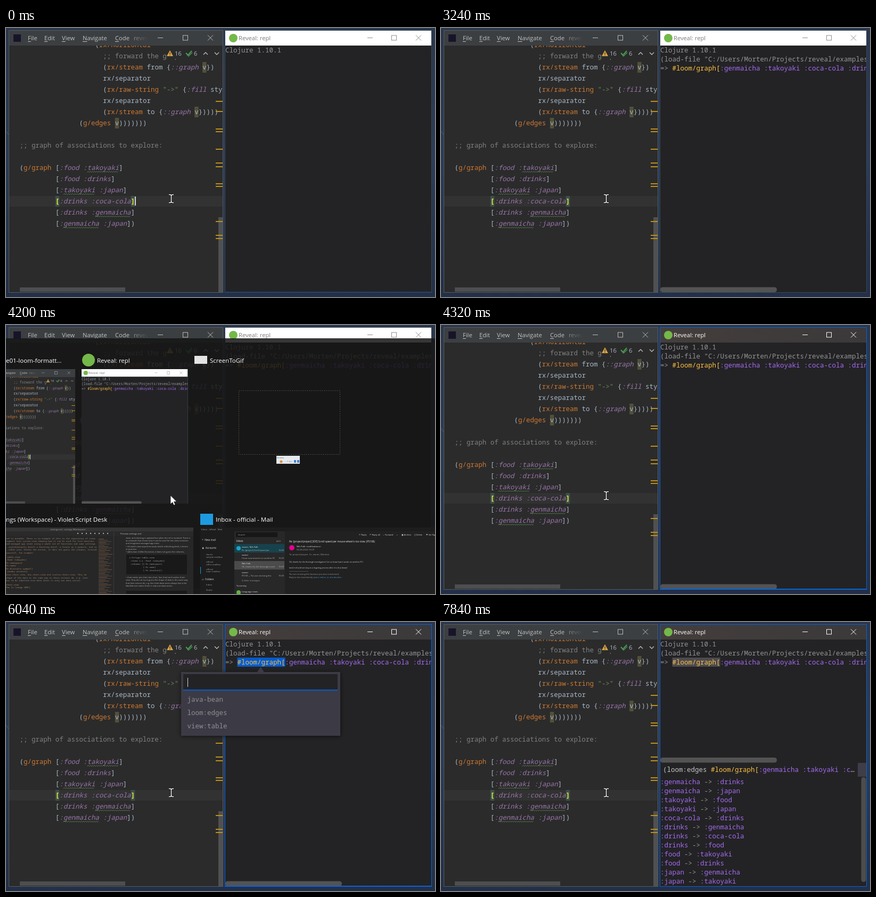
Animation, 806 px wide and 506 px high, one loop 8 s. Source, as an HTML page with a canvas:

```html
<!DOCTYPE html>
<html lang="en">
<head>
<meta charset="utf-8">
<title>Graph exploration in a REPL</title>
<style>
html, body { margin: 0; width: 100%; height: 100%; overflow: hidden; background: #28344a; }
canvas { display: block; }
</style>
</head>
<body>
<canvas id="stage" width="806" height="506"></canvas>
<script>
const ctx = document.getElementById('stage').getContext('2d');
const LOOP = 8000;
const MONO = '"Noto Sans Mono", monospace';
const SANS = '"Open Sans", "Noto Sans", sans-serif';
const BLUE = '#005cd0', BODY = '#232325', AMBER = '#ffc040', PURPLE = '#a46bf0', GRAY = '#949494';

function box(x, y, w, h, color, radius = 0) {
  ctx.fillStyle = color;
  if (!radius) return ctx.fillRect(x, y, w, h);
  ctx.beginPath();
  ctx.roundRect(x, y, w, h, radius);
  ctx.fill();
}

function dot(x, y, r, color) {
  ctx.fillStyle = color;
  ctx.beginPath();
  ctx.arc(x, y, r, 0, 7);
  ctx.fill();
}

function path(points, color, width = 1) {
  ctx.strokeStyle = color;
  ctx.lineWidth = width;
  ctx.beginPath();
  points.forEach(([x, y]) => ctx.lineTo(x, y));
  ctx.stroke();
}

function shape(points, color) {
  ctx.fillStyle = color;
  ctx.beginPath();
  points.forEach(([x, y]) => ctx.lineTo(x, y));
  ctx.fill();
}

function text(str, x, y, color, font = '11.2px ' + SANS) {
  ctx.font = font;
  ctx.fillStyle = color;
  ctx.fillText(str, x, y);
}

function blend(x0, y0, x1, y1, ...colors) {
  const gradient = ctx.createLinearGradient(x0, y0, x1, y1);
  colors.forEach((color, i) => gradient.addColorStop(i / (colors.length - 1), color));
  return gradient;
}

function clipped(x, y, w, h, draw) {
  ctx.save();
  ctx.beginPath();
  ctx.rect(x, y, w, h);
  ctx.clip();
  draw();
  ctx.restore();
}

function controls(xs, color) {
  const [min, max, close] = xs, y = 18.5;
  path([[min - 5, y], [min + 5, y]], color);
  ctx.strokeRect(max - 4.5, y - 4.5, 9, 9);
  path([[close - 5, y - 5], [close + 5, y + 5]], color);
  path([[close + 5, y - 5], [close - 5, y + 5]], color);
}

/* ---------- code editor ---------- */

const COL = 7.47;
const CODE_STYLES = {
  d: { color: '#a9b7c6' },
  o: { color: '#cc7832' },
  s: { color: '#6a8759' },
  c: { color: '#808080' },
  k: { color: '#9876aa', font: 'italic ' },
  w: { color: '#9876aa', font: 'italic ', wave: true },
  v: { color: '#a9b7c6', back: '#52503a' },
  b: { color: '#ffef28', font: 'bold ', back: '#3b514d' }
};

function wave(x, y, width) {
  const points = [];
  for (let i = 0; i <= width; i += 2) points.push([x + i, y + (i % 4 ? -1 : 1)]);
  path(points, '#56824f');
}

// The first letter of each run names its style.
function codeLine(col, mid, ...runs) {
  let x = 25.5 + col * COL;
  for (const run of runs) {
    const style = CODE_STYLES[run[0]], str = run.slice(1), width = str.length * COL;
    if (style.back) box(x, mid - 10, width, 20, style.back);
    text(str, x, mid + 4, style.color, (style.font || '') + '12.45px ' + MONO);
    if (style.wave) wave(x + COL, mid + 7.5, width - COL);
    x += width;
  }
}

function editorCode() {
  codeLine(19, 32, 'd(', 'orx/horizontal');
  codeLine(21, 53, 'c;; forward the graph');
  codeLine(21, 74, 'd(', 'orx/stream', 'd from {', 'k::graph', 'd ', 'vv', 'd})');
  codeLine(21, 95, 'drx/separator');
  codeLine(21, 116, 'd(', 'orx/raw-string', 'd ', 's"->"', 'd {', 'k:fill', 'd style');
  codeLine(21, 137, 'drx/separator');
  codeLine(21, 158, 'd(', 'orx/stream', 'd to {', 'k::graph', 'd ', 'vv', 'd}))))');
  codeLine(15, 179, 'd(', 'og/edges', 'd ', 'vv', 'd)))))))');
  codeLine(0, 221, 'c;; graph of associations to explore:');
  codeLine(0, 263, 'd(', 'og/graph', 'd [', 'k:food', 'd ', 'w:takoyaki', 'd]');
  codeLine(9, 284, 'd[', 'k:food', 'd ', 'k:drinks', 'd]');
  codeLine(9, 305, 'd[', 'w:takoyaki', 'd ', 'k:japan', 'd]');
  codeLine(9, 326, 'b[', 'k:drinks', 'd ', 'k:coca-cola', 'b]');
  codeLine(9, 347, 'd[', 'k:drinks', 'd ', 'w:genmaicha', 'd]');
  codeLine(9, 368, 'd[', 'w:genmaicha', 'd ', 'k:japan', 'd])');
}

function inspections() {
  box(303, 38, 104, 20, '#2b2b2b');
  shape([[308, 42], [314, 53], [302, 53]], '#d9a343');
  box(307.4, 46, 1.3, 3.5, '#2b2b2b');
  box(307.4, 50.5, 1.3, 1.3, '#2b2b2b');
  text('16', 317, 52, '#a9b7c6');
  path([[338, 47], [342, 51], [349, 43]], '#499c54', 2);
  path([[340, 50], [343, 53], [350, 46]], '#499c54', 1.3);
  text('6', 353, 52, '#a9b7c6');
  path([[371, 50], [375, 46], [379, 50]], '#b8bcbf', 1.4);
  path([[392, 46], [396, 50], [400, 46]], '#b8bcbf', 1.4);
}

function editorTitle() {
  box(6, 5, 401, 28, '#3c3f41');
  box(14, 12, 14, 14, '#17142a');
  const menu = [['File', 41], ['Edit', 72], ['View', 105], ['Navigate', 144], ['Code', 205]];
  for (const [name, x] of menu) {
    text(name, x, 23, '#c0c0c0');
    box(x, 25, ctx.measureText(name[0]).width, 1, '#c0c0c0');
  }
  text('revea', 240, 23, blend(240, 0, 267, 0, '#8c8e8f', '#3c3f41'));
  controls([290, 337, 384], '#bbbbbb');
}

function editor(caret) {
  box(5, 4, 403, 494, '#565b5f');
  clipped(6, 5, 401, 492, () => {
    box(6, 33, 401, 464, '#2b2b2b');
    box(6, 316, 401, 20, '#323232');
    clipped(6, 33, 401, 464, editorCode);
    inspections();
    box(399, 356, 8, 141, '#4f5051');
    box(26, 488, 198, 8, '#4d4e4f');
    for (const y of [138, 157, 190, 195, 228, 254, 261, 293, 298, 364, 390, 396])
      box(394, y - 1, 13, 2, '#be9117');
    if (caret) box(242, 317, 2, 17, '#d0d0d0');
    editorTitle();
  });
}

/* ---------- REPL window ---------- */

const CELL = 7.5;

function replLine(x, mid, ...runs) {
  for (const [str, color] of runs) {
    text(str, x, mid + 4, color, '12.5px ' + MONO);
    x += str.length * CELL;
  }
}

const EDGES = [
  'genmaicha drinks', 'genmaicha japan', 'takoyaki food', 'takoyaki japan',
  'coca-cola drinks', 'drinks genmaicha', 'drinks coca-cola', 'drinks food',
  'food takoyaki', 'food drinks', 'japan genmaicha', 'japan takoyaki'
];

function edgesPanel() {
  box(412, 265, 387, 232, BODY);
  box(783, 265, 16, 26, '#3e3d48');
  replLine(417, 278, ['(loom:edges ', '#c4c4c4'], ['#loom/graph[', AMBER],
    [':genmaicha :takoyaki :c', PURPLE], ['…', '#c4c4c4']);
  EDGES.forEach((edge, i) => {
    const [from, to] = edge.split(' ');
    replLine(412, 301 + 17 * i, [':' + from, PURPLE], [' -> ', GRAY], [':' + to, PURPLE]);
  });
  box(789.5, 292, 9, 197, '#4d4d4d', 4.5);
}

function repl(s) {
  const accent = '#0a63d6';
  box(411, 4, 389, 494, s.active ? accent : '#3a4554');
  clipped(412, 5, 387, 492, () => {
    box(412, 5, 387, 28, s.active ? blend(412, 0, 799, 0, '#443e3c', '#3b393a') : '#ffffff');
    dot(427, 19, 8, '#74b84a');
    text('Reveal: repl', 437, 23, s.active ? '#ffffff' : '#7c7c7c');
    controls([684, 729, 775], s.active ? '#ffffff' : '#8c8c8c');
    box(412, 33, 387, 464, BODY);
    replLine(412, 42, ['Clojure 1.10.1', GRAY]);
    if (s.loaded)
      replLine(412, 59, ['(load-file "C:/Users/Morten/Projects/reveal/examples/', GRAY]);
    if (s.result) {
      if (s.pick === 'prompt') box(412, 67, 15, 17, BLUE);
      if (s.pick === 'graph') box(434.5, 67, 90, 17, s.panel ? '#4c4b50' : BLUE);
      replLine(412, 76, ['=> ', GRAY], ['#loom/graph[', AMBER],
        [':genmaicha :takoyaki :coca-cola :drinks', PURPLE]);
    }
    if (s.scroll) box(412, s.panel ? 255 : 487.5, 219, 9.5, '#535353', 4.5);
    if (s.panel) edgesPanel();
    else if (s.active) box(412, 496, 387, 1, accent);
    else if (!s.scroll) box(412, 496, 387, 1, '#123f7c');
  });
}

function popup(t) {
  const focused = t < 6760;
  ctx.save();
  ctx.shadowColor = 'rgba(0,0,0,.6)';
  ctx.shadowBlur = 8;
  ctx.shadowOffsetY = 1;
  box(329, 94, 299, 120, '#3c3b45');
  ctx.restore();
  shape([[478.5, 84], [485, 94.5], [472, 94.5]], '#3c3b45');
  box(333, 98, 290, 31, BODY);
  if (focused) box(333, 127, 290, 2, BLUE);
  if (t < 6440) box(341, 105, 1, 17, '#d8d8d8');
  const chosen = focused ? -1 : t < 7000 ? 0 : 1;
  ['java-bean', 'loom:edges', 'view:table'].forEach((item, i) => {
    if (i === chosen) box(333, 134 + 25 * i, 290, 25, BLUE);
    replLine(340.5, 146 + 25 * i, [item, i === chosen ? '#d6dcea' : '#8e8e93']);
  });
}

/* ---------- task switcher ---------- */

function tiny(str, x, y, color = '#a0a0a0', family = SANS, size = 4.2) {
  text(str, x, y, color, size + 'px ' + family);
}

function thumbnail(x, y, fromX, draw) {
  ctx.save();
  ctx.translate(x, y);
  ctx.scale(.515, .515);
  ctx.translate(-fromX, -5);
  draw();
  ctx.restore();
}

function docsThumb() {
  const warm = '#a5805f', plain = '#96897c', code = '#b08a66';
  box(0, 381, 352, 125, '#272727');
  box(0, 381, 352, 7, '#343435');
  box(0, 388, 352, 9, '#2a2a2b');
  tiny('settings.md - settings (Workspace)', 83, 386);
  tiny('Preview settings.md', 215, 394, '#c8c8c8');
  for (let i = 0; i < 8; i++) dot(135 + i * 8, 392, 1.2, '#a8a8a8');
  const prose = [
    'ref is mutable. There is an example of this in the repository of views',
    'segment tree system view showing how it can be used for live monitors',
    'and managed app state using a small set of functions and some settings',
    '- asynchronously derefs a blocking deref, a future or a promise, and so',
    '- table view. Unlike the action, it does not guess the columns, instead',
    'yourself, for example:'
  ];
  prose.forEach((line, i) => tiny(line, 0, 402.5 + 5.4 * i, i % 2 ? warm : plain, MONO, 4));
  ['-table-view', ':food :takoyaki}', 'fn namespace}', 'fn name}', 'fn #(resolve symbol)}', ':render resolve}]']
    .forEach((line, i) => tiny(line, 0, 438 + 5.4 * i, code, MONO, 4));
  tiny('line-chart-view, bar-chart-view and scatter-chart-view. They do', 0, 471, warm, MONO, 4);
  tiny('shape of the data in the same way as their actions do, e.g. line', 0, 477, plain, MONO, 4);
  tiny('has to be labelled even when there is only one data series:', 0, 482, plain, MONO, 4);
  tiny('chart-view', 0, 490, code, MONO, 4);
  tiny('for [x (range 100)]', 0, 495, code, MONO, 4);
  for (let i = 0; i < 44; i++) box(174, 402 + i * 2.4, 10 + (i * 7) % 17, 1, i % 3 ? '#574a3f' : '#75533c');
  box(202, 389, 1, 117, '#3a3a3a');
  box(226, 432, 114, 37, '#19191a');
  box(226, 500, 114, 6, '#19191a');
  ['state, and showing it updated live when the ref is mutated. There is',
    'an example that shows how it can be used for live state monitors',
    'and integrated managed app state.',
    '• ref-watch-view asynchronously derefs a blocking deref, a future',
    'or promise.',
    '• table-view. Unlike the action, it does not guess the columns,'
  ].forEach((line, i) => tiny(line, 225, 402 + 5.2 * i, '#b4b4b4', SANS, 3.9));
  ['{:fx/type table-view', ' :items [:a :food :takoyaki]', ' :columns [{:fn namespace}', '           {:fn name}', '           {:fn resolve}]}']
    .forEach((line, i) => tiny(line, 231, 439 + 6 * i, '#a3a3a3', MONO, 4));
  ['• chart views: pie-chart, bar-chart, line-chart and scatter-chart',
    'view. They do not try to guess the shape of data in the same way',
    'that their actions do, e.g. line chart data series always has to be',
    'labelled even when there is only one data series:'
  ].forEach((line, i) => tiny(line, 225, 476 + 5.4 * i, '#b4b4b4', SANS, 3.9));
}

function mailThumb() {
  box(365, 381, 441, 125, '#1d1d1e');
  box(429, 388, 95, 118, '#282829');
  box(524, 388, 282, 118, '#212122');
  tiny('Inbox - official - Mail', 367, 386);
  [['+  New mail', 406], ['♟  Accounts', 421], ['▱  Folders', 480]]
    .forEach(([str, y]) => tiny(str, 368, y, '#e0e0e0', SANS, 4.8));
  [['classic', 433], ['sample mailbox', 438], ['official', 447], ['office mailbox', 452], ['official', 461], ['main mailbox', 465], ['Inbox', 490], ['Drafts', 500]]
    .forEach(([str, y]) => tiny(str, 376, y));
  box(365, 455, 1, 13, '#1e9be0');
  box(432, 390, 78, 9, '#171717');
  tiny('Search', 436, 396);
  tiny('Inbox', 433, 408, '#ffffff', SANS, 4.8);
  tiny('All ▾', 508, 408);
  box(429, 412, 94, 16, '#17424d');
  dot(437, 420, 4, '#18a6c4');
  box(429, 444, 94, 16, '#4b4b4c');
  [['owner, Nils Falk', 'Re: [project] Scroll speed per', 419],
    ['owner', 'I have now tested it on another PC', 434],
    ['Nils Falk', 'Ok, thanks for the thorough invest', 450],
    ['owner', 'PS168 — You are receiving this', 467]
  ].forEach(([who, subject, y]) => {
    tiny(who, 443, y, '#e4e4e4');
    tiny(subject, 443, y + 6, '#b8b8b8', SANS, 3.9);
    tiny('16:09', 512, y + 6, '#b8b8b8', SANS, 3.9);
  });
  tiny('4 older messages', 443, 482);
  tiny('Yesterday', 433, 492, '#d0d0d0');
  dot(437, 503, 4, '#63b246');
  tiny('Language news', 443, 503, '#e4e4e4');
  [['↶ Reply', 663], ['↶ Reply all', 683], ['→ Forward', 707], ['☼', 733], ['▣ Archive', 743], ['▯ Delete', 767], ['⚑ Set flag', 789]]
    .forEach(([str, x]) => tiny(str, x, 396, '#d8d8d8', SANS, 4));
  tiny('Re: [project/project] [IDE] Scroll speed per mouse wheel is too slow. (PS168)', 532, 409, '#ededed', SANS, 4.6);
  dot(537, 419, 5, '#e3008c');
  tiny('Nils Falk <notifications>', 546, 418, '#e4e4e4');
  tiny('06.08.2020 16:09', 546, 424);
  tiny('To: project/project  Cc: owner; Mention', 532, 433);
  tiny('Ok, thanks for the thorough investigation! Let us know how it works on another PC!', 532, 447, '#d4d4d4', SANS, 3.6);
  tiny('(and it should not stay as a lingering process after it is shut down)', 532, 458, '#d4d4d4', SANS, 3.6);
  box(532, 463, 36, .6, '#666');
  tiny('You are receiving this because you were mentioned.', 532, 470, '#a0a0a0', SANS, 3.9);
  tiny('Reply to this email directly,', 532, 475.5, '#a0a0a0', SANS, 3.6);
  tiny('view it online, or unsubscribe.', 577, 475.5, '#4b9bd0', SANS, 3.9);
}

function switcher(state) {
  const label = (str, x, y) => text(str, x, y, '#ffffff', '11.5px ' + SANS);
  box(0, 25, 806, 481, 'rgba(22,22,22,.86)');
  label('e01-loom-formatt...', 0, 71);
  dot(155, 66, 12, '#74b84a');
  label('Reveal: repl', 171, 71);
  box(354, 58, 24, 15, '#e4e4e4');
  label('ScreenToGif', 383, 71);
  clipped(0, 83, 130, 253, () => thumbnail(-76.5, 83, 6, () => editor(true)));
  clipped(142, 83, 200, 253, () => thumbnail(142, 83, 412, () => repl(state)));

  ctx.setLineDash([2, 2]);
  ctx.strokeStyle = '#4a4a4a';
  ctx.lineWidth = 1;
  ctx.strokeRect(437.5, 123.5, 190, 120);
  ctx.setLineDash([]);
  box(508, 246, 44, 15, '#e6e9ed');
  tiny('Screen', 509, 251, '#555');
  dot(517, 257, 2.5, '#e48a32');
  tiny('– – 5 fps', 522, 258, '#777');
  box(541, 254, 4, 5, '#3f84d6');
  box(547, 254, 4, 5, '#3f84d6');

  label('ngs (Workspace) - Violet Script Desk', 0, 370);
  box(365, 355, 24, 21, '#1e9be0');
  label('Inbox - official - Mail', 394, 370);
  docsThumb();
  mailThumb();
}

/* ---------- scene ---------- */

function desktop() {
  box(0, 0, 806, 506, blend(0, 0, 0, 506, '#2a374d', '#2a3c58', '#222f48'));
  path([[0, 194], [6, 202]], '#496080');
}

function textPointer() {
  const beam = [[[306, 313.5], [309, 313.5], [310.5, 315], [312, 313.5], [315, 313.5]],
    [[310.5, 315], [310.5, 327]],
    [[306, 328.5], [309, 328.5], [310.5, 327], [312, 328.5], [315, 328.5]]];
  beam.forEach(p => path(p, '#111111', 3.4));
  beam.forEach(p => path(p, '#ffffff', 1.5));
}

function arrowPointer() {
  const arrow = [[309, 320.5], [309, 337], [312.8, 333.5], [315.4, 339], [318, 337.8], [315.5, 332.4], [320.5, 332]];
  shape(arrow, '#ffffff');
  path([...arrow, arrow[0]], '#111111', .7);
}

const BLINKS = [280, 760, 1320, 1760, 2240, 2800, 3240, 3800];

function draw(t) {
  const state = {
    loaded: t >= 1840,
    scroll: t >= 1920,
    result: t >= 2560,
    active: t >= 4320,
    pick: t >= 5120 ? 'graph' : t >= 4720 ? 'prompt' : '',
    panel: t >= 7840
  };
  const caret = !state.active && BLINKS.filter(b => t >= b).length % 2 === 0;
  desktop();
  editor(caret);
  repl(state);
  if (t >= 4120 && t < 4320) {
    ctx.globalAlpha = t < 4200 ? .6 : 1;
    switcher(state);
    ctx.globalAlpha = 1;
    arrowPointer();
  } else {
    textPointer();
  }
  if (t >= 6040 && t < 7680) popup(t);
}

function tick() {
  draw(performance.now() % LOOP);
  requestAnimationFrame(tick);
}
tick();
</script>
</body>
</html>
```
